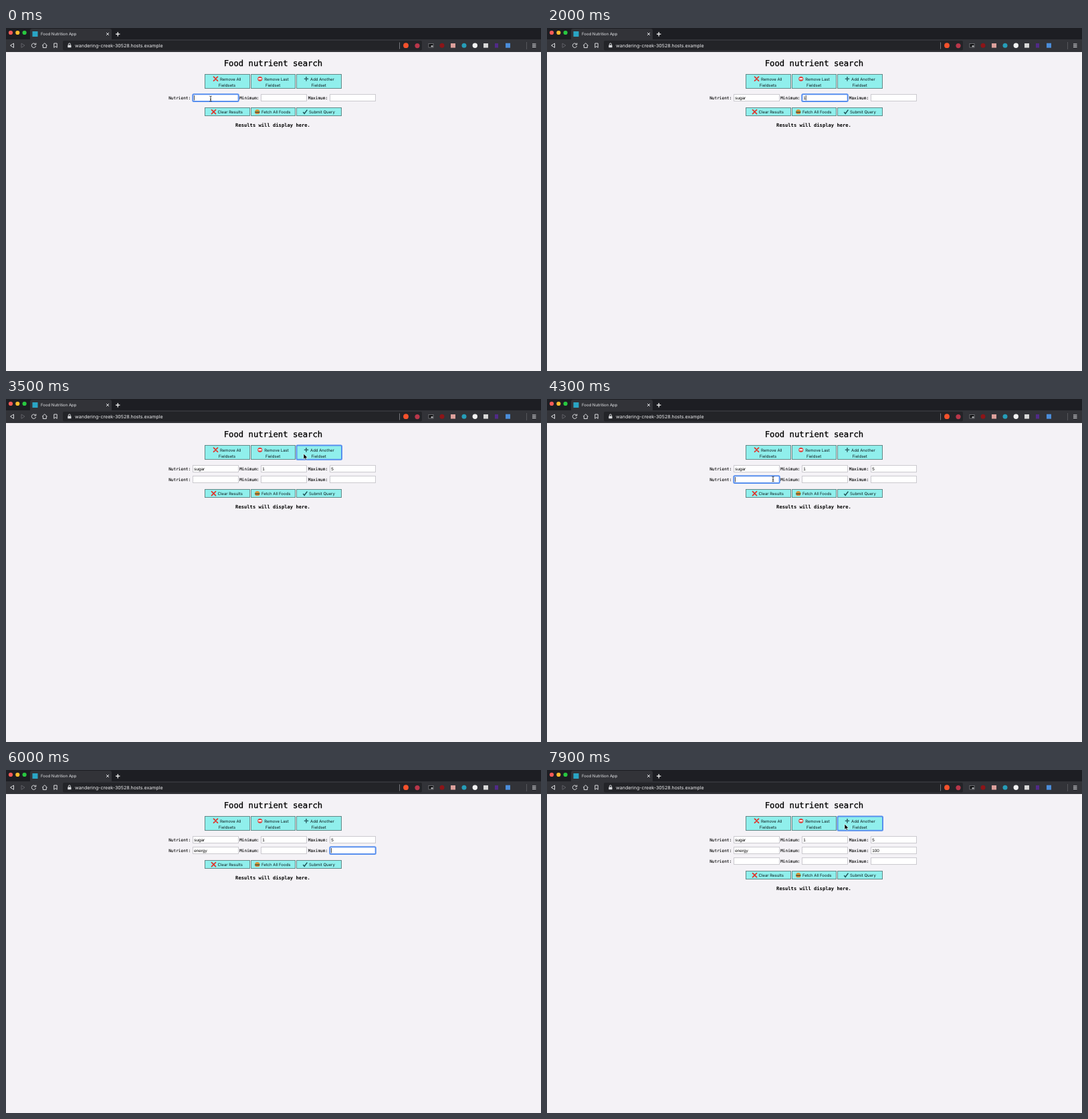
Animation, 800 px wide and 514 px high, one loop 8000 ms. Source, as an HTML page:

```html
<!DOCTYPE html>
<html lang="en">
<head>
<meta charset="utf-8">
<title>Food Nutrition App</title>
<style>
html, body { margin: 0; width: 100%; height: 100%; overflow: hidden; background: #f4f2f6; }
svg { display: block; width: 100vw; height: 100vh; }
text { text-rendering: geometricPrecision; white-space: pre; }
.ui { font: 6px Inter, sans-serif; fill: #0c1c1e; }
.mono { font: 6.08px "DejaVu Sans Mono", monospace; fill: #000; stroke: #000; stroke-width: .08; }
.mono.title { font-size: 12.25px; stroke-width: .3; }
.mono.note { font-size: 7.15px; font-weight: bold; stroke: none; }
.value { font: 6.35px "Liberation Sans", Arial, sans-serif; fill: #000; }
.mid { text-anchor: middle; }
.btn { fill: #90efec; stroke: #638887; }
.box { fill: #fff; stroke: #cbcacf; }
.ring { fill: none; stroke: #588fee; stroke-width: 2; }
.line { fill: none; stroke: #dcdde0; stroke-width: 1; }
</style>
</head>
<body>
<svg viewBox="0 0 800 514" preserveAspectRatio="none">
  <defs>
    <path id="cross" d="M-3 -3 L3 3 M3 -3 L-3 3" stroke="#e0352d" stroke-width="1.7" stroke-linecap="round"/>
  </defs>

  <!-- browser window -->
  <rect width="800" height="18" fill="#1d1e23"/>
  <path d="M36 18 V4 Q36 1 39 1 H155 Q158 1 158 4 V18Z" fill="#323338"/>
  <rect y="17" width="800" height="19" fill="#323338"/>
  <rect x="85" y="19" width="537" height="14.5" rx="2" fill="#232428"/>
  <circle cx="7" cy="7" r="3.1" fill="#fc5b57"/>
  <circle cx="17.3" cy="7" r="3.1" fill="#fdbc2e"/>
  <circle cx="27.6" cy="7" r="3.1" fill="#28c840"/>
  <rect x="39.5" y="5" width="8" height="8" fill="#2aa5c4"/>
  <text class="ui" x="52" y="11.3" style="fill:#e6e7ea">Food Nutrition App</text>
  <g class="line">
    <path d="M150 7 L154 11 M154 7 L150 11"/>
    <path d="M164 9.2 H170.4 M167.2 6 V12.4" stroke="#fff" stroke-width="1.2"/>
    <path d="M11.5 23 V29.4 L6.5 26.2Z"/>
    <path d="M23 23 V29.4 L28 26.2Z" stroke="#606167"/>
    <path d="M44.2 24.5 A3.2 3.2 0 1 0 44.6 27 M44.8 22.5 V25 H42.2"/>
    <path d="M54 26.3 L57.8 22.7 L61.6 26.3 M55.3 25.6 V29.5 H60.3 V25.6"/>
    <path d="M71.8 23 H76.2 V29.4 L74 27.4 L71.8 29.4Z"/>
    <path d="M93.4 25.6 V24.4 A1.4 1.4 0 0 1 96.4 24.4 V25.6"/>
    <path d="M588.5 21.5 V31.5" stroke="#77787d"/>
    <path d="M778.5 21 V32" stroke="#55565b"/>
    <path d="M787 24 H792.5 M787 26.3 H792.5 M787 28.6 H792.5"/>
  </g>
  <rect x="92.3" y="25.5" width="5.2" height="3.8" rx=".5" fill="#dcdde0"/>
  <text class="ui" x="103" y="28.5" style="font-size:7.05px;fill:#f0f0f2">wandering-creek-30528.hosts.example</text>
  <circle cx="598" cy="26.2" r="3.9" fill="#f4512c"/>
  <circle cx="615" cy="26.6" r="3.6" fill="#b9364a"/>
  <rect x="632" y="23.5" width="7" height="5.5" fill="#111214" stroke="#85868a" stroke-width=".7"/>
  <rect x="635.5" y="26.2" width="3" height="2.2" fill="#b9babd"/>
  <circle cx="652" cy="26.2" r="3.5" fill="#8c1518"/>
  <rect x="665" y="23" width="7" height="6.6" fill="#dca09c"/>
  <circle cx="685" cy="26.2" r="3.5" fill="#269db8"/>
  <circle cx="701.3" cy="26.2" r="3.7" fill="#f2f2f2"/>
  <rect x="714" y="23" width="7" height="6.6" fill="#d8d8d8"/>
  <rect x="731" y="23" width="5" height="6.6" fill="#512a88"/>
  <rect x="747" y="22.7" width="7" height="7" fill="#4b8dda"/>

  <!-- page -->
  <text class="mono title mid" x="399.4" y="57">Food nutrient search</text>
  <rect class="btn" x="297.5" y="69.5" width="67" height="21"/>
  <rect class="btn" x="366.5" y="69.5" width="66" height="21"/>
  <rect class="btn" x="434.5" y="69.5" width="67" height="21"/>
  <use href="#cross" x="313.5" y="76.2"/>
  <circle cx="379.8" cy="76.2" r="3.5" fill="#dc4540"/>
  <rect x="377.4" y="75.2" width="4.8" height="2" fill="#fff"/>
  <path d="M445.8 76.2 H452.2 M449 73 V79.4" stroke="#33686d" stroke-width="1.6"/>
  <g class="ui">
    <text x="320" y="78.7">Remove All</text>
    <text x="386.3" y="78.7">Remove Last</text>
    <text x="455" y="78.7">Add Another</text>
    <g class="mid">
      <text x="330.4" y="87.7">Fieldsets</text>
      <text x="399" y="87.7">Fieldset</text>
      <text x="467.7" y="87.7">Fieldset</text>
    </g>
  </g>

  <g id="rows"></g>

  <g id="lower">
    <rect class="btn" x="297.5" y="119.5" width="67" height="12"/>
    <rect class="btn" x="366.5" y="119.5" width="66" height="12"/>
    <rect class="btn" x="434.5" y="119.5" width="67" height="12"/>
    <use href="#cross" x="310.5" y="125.6"/>
    <path d="M372.3 125 Q372.6 122 375.8 122 T379.3 125Z" fill="#dd9138"/>
    <rect x="372" y="124.8" width="7.6" height="1.1" fill="#6b8f32"/>
    <rect x="372.3" y="125.9" width="7" height="1.4" fill="#6d3320"/>
    <path d="M372.4 127.3 H379.2 Q379 129 377.6 129 H374 Q372.6 129 372.4 127.3Z" fill="#d98836"/>
    <path d="M444.2 126 L446.2 128.3 L450.4 122.6" fill="none" stroke="#1f5559" stroke-width="1.5"/>
    <g class="ui">
      <text x="316.5" y="127.9">Clear Results</text>
      <text x="381.9" y="127.9">Fetch All Foods</text>
      <text x="453" y="127.9">Submit Query</text>
    </g>
    <text class="mono note mid" x="399" y="148.4">Results will display here.</text>
  </g>

  <rect id="ring" class="ring" rx="1.5"/>
  <rect id="caret" width=".7" height="7.4" fill="#000"/>
  <path id="arrow" d="M0 0 V8.2 L1.9 6.5 L3.2 9.3 L4.6 8.7 L3.4 6 H6Z" fill="#000" stroke="#fff" stroke-width=".6"/>
  <path id="beam" d="M-1.6 -3.8 Q0 -3.8 0 -2.8 Q0 -3.8 1.6 -3.8 M0 -2.8 V2.8 M-1.6 3.8 Q0 3.8 0 2.8 Q0 3.8 1.6 3.8 M-1 .9 H1"
    fill="none" stroke="#111" stroke-width=".8"/>
</svg>

<script>
const LOOP = 8000, STEP = 100, ROW = 16, ADD = -1;
const inputX = [279.5, 381.5, 484.5];
const labels = [["Nutrient:", 243.2], ["Minimum:", 349.2], ["Maximum:", 451.8]];
const rowTimes = [0, 3500, 7700];

// [time, focused field, new value]; fields count left to right, row by row
const events = [[0, 0]];
const type = (field, word, times) =>
  times.forEach((t, i) => events.push([t, field, word.slice(0, i + 1)]));
type(0, "sugar", [400, 500, 700, 800, 1000]);
events.push([1500, 1]);
type(1, "1", [1800]);
events.push([2100, 2]);
type(2, "5", [2300]);
events.push([3300, ADD], [4100, 3]);
type(3, "energy", [4600, 4800, 4900, 5100, 5300, 5400]);
events.push([5600, 4], [5900, 5]);
type(5, "100", [6300, 6400, 6500]);
events.push([7400, ADD]);

// pointer stops: [time, x, y]
const stops = [[0, 306, 106], [2700, 306, 106], [3000, 434, 92], [3200, 445, 82],
  [3600, 445, 82], [4000, 338, 120], [7000, 338, 120], [7300, 445, 81]];
const shown = [[0, 400], [2700, 4600], [7000, LOOP]];

const $ = id => document.getElementById(id);
function add(parent, tag, attrs, content = "") {
  const el = document.createElementNS("http://www.w3.org/2000/svg", tag);
  for (const k in attrs) el.setAttribute(k, attrs[k]);
  el.textContent = content;
  return parent.appendChild(el);
}
function set(el, attrs) {
  for (const k in attrs) el.setAttribute(k, attrs[k]);
}
const show = (el, on) => el.style.display = on ? "" : "none";

const fields = [];
const rows = rowTimes.map((_, r) => {
  const g = add($("rows"), "g", { transform: `translate(0 ${r * ROW})` });
  labels.forEach(([word, x], i) => {
    add(g, "text", { class: "mono", x, y: 106.7 }, word);
    add(g, "rect", { class: "box", x: inputX[i], y: 99.5, width: 68, height: 10 });
    fields.push(add(g, "text", { class: "value", x: inputX[i] + 1.8, y: 106.8 }));
  });
  return g;
});

function pointerAt(t) {
  let i = stops.length - 1;
  while (stops[i][0] > t) i--;
  const a = stops[i], b = stops[i + 1] || a;
  const k = b === a ? 0 : (t - a[0]) / (b[0] - a[0]);
  const e = k * k * (3 - 2 * k);
  return [a[1] + (b[1] - a[1]) * e, a[2] + (b[2] - a[2]) * e];
}

function render(t) {
  const count = rowTimes.filter(s => s <= t).length;
  rows.forEach((g, i) => show(g, i < count));
  set($("lower"), { transform: `translate(0 ${(count - 1) * ROW})` });

  const values = fields.map(() => "");
  let focus = 0, last = 0;
  for (const [time, field, value] of events) {
    if (time > t) break;
    focus = field;
    last = time;
    if (value) values[field] = value;
  }
  fields.forEach((el, i) => { if (el.textContent !== values[i]) el.textContent = values[i]; });

  const typing = focus !== ADD;
  if (typing) {
    const x = inputX[focus % 3], y = 99.5 + Math.floor(focus / 3) * ROW;
    set($("ring"), { x: x - .2, y: y - .2, width: 68.4, height: 10.6 });
    const w = values[focus] ? fields[focus].getComputedTextLength() : 0;
    set($("caret"), { x: x + 1.8 + w, y: y + 1.5 });
  } else {
    set($("ring"), { x: 434.5, y: 69.5, width: 67.5, height: 21.3 });
  }
  show($("caret"), typing && (t - last) % 1000 < 500);

  const [px, py] = pointerAt(t);
  const visible = shown.some(([a, b]) => t >= a && t < b);
  const overInput = inputX.some(x => px > x && px < x + 68) &&
    rows.some((_, r) => r < count && Math.abs(py - 104.5 - r * ROW) < 5);
  for (const [id, on] of [["arrow", !overInput], ["beam", overInput]]) {
    show($(id), visible && on);
    set($(id), { transform: `translate(${px} ${py})` });
  }
}

const start = performance.now();
function tick() {
  const t = (performance.now() - start) % LOOP;
  render(Math.floor(t / STEP) * STEP);
  requestAnimationFrame(tick);
}
tick();
</script>
</body>
</html>
```
